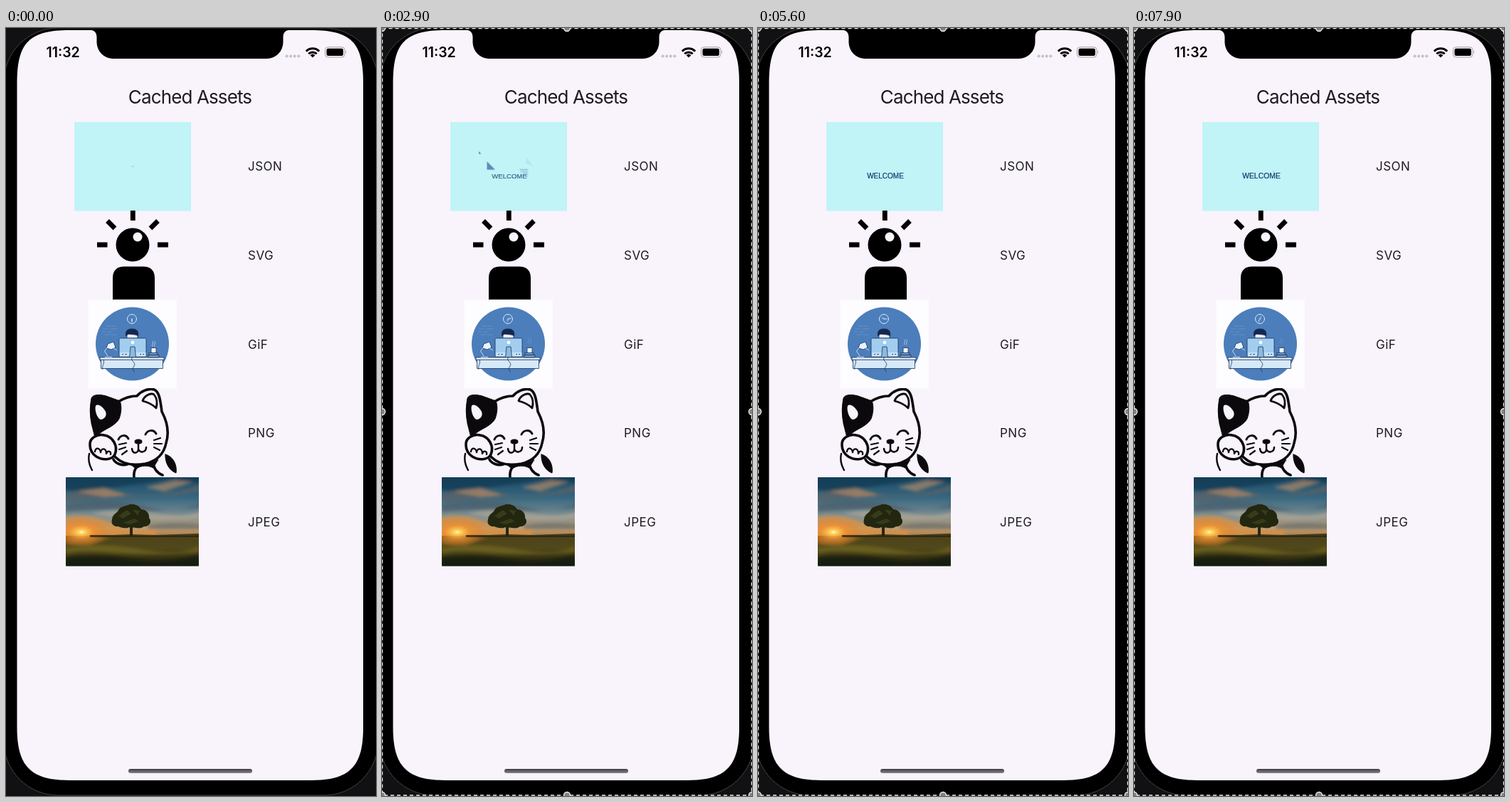
Recreate the animation shown at these times as an HTML page. Size 520 by 1077 pixels, loop 8 s.

```html
<!DOCTYPE html>
<html lang="en">
<head>
<meta charset="utf-8">
<title>Cached Assets</title>
<style>
  html, body { margin: 0; width: 100%; height: 100%; overflow: hidden; background: #000; }
  svg { display: block; width: 100%; height: 100%; }
  text { font-family: Inter, Roboto, sans-serif; font-optical-sizing: none; fill: #1d1b20; }
  .labels text { font-size: 17px; letter-spacing: .5px; }
  .line { fill: none; stroke-linecap: round; stroke-linejoin: round; }

  .anim { animation: 8s linear infinite; }
  .select { animation-name: select; animation-timing-function: step-end; }
  .dot { animation-name: dot; }
  .burst { animation-name: burst; transform-origin: 178px 194px; }
  .wedge { animation-name: wedge; }
  .stripes { animation-name: stripes; }
  .drift { animation-name: drift; }
  .word { animation-name: word; transform-origin: 179px 207px; }
  .alarm { animation-name: alarm; animation-timing-function: step-end; }
  .calm { animation-name: calm; animation-timing-function: step-end; }
  .minute { animation-name: minute; transform-origin: 177px 408px; }
  .hour { animation-name: hour; transform-origin: 177px 408px; }
  .steam { animation: steam 1.6s linear infinite; }
  .shake { animation: shake .2s step-end infinite; transform-origin: 177px 408px; }

  @keyframes select { 0% { opacity: 0 } 23.75%, 100% { opacity: 1 } }
  @keyframes dot { 0%, 10% { opacity: 1 } 16%, 100% { opacity: 0 } }
  @keyframes burst {
    0%, 10% { transform: scale(.03); opacity: 0 }
    14% { transform: scale(.2); opacity: 1 }
    25% { transform: none; opacity: 1 }
    34%, 100% { transform: scale(1.4); opacity: 0 }
  }
  @keyframes wedge {
    0%, 13% { transform: translate(178px, 194px) scale(0); fill: #123b78 }
    25% { transform: translate(165px, 184px); fill: #123b78; opacity: 1 }
    46.25% { transform: translate(132px, 190px) scale(1.08); fill: #a5d0ef; opacity: 1 }
    53%, 100% { transform: translate(121px, 192px); fill: #a5d0ef; opacity: 0 }
  }
  @keyframes stripes {
    0%, 13% { transform: translate(178px, 194px) scale(0) }
    25% { transform: translate(179px, 191px); opacity: 1 }
    46.25% { transform: translate(206px, 204px) scale(.95); opacity: .85 }
    53%, 100% { transform: translate(215px, 208px); opacity: 0 }
  }
  @keyframes drift {
    0%, 26% { opacity: 0; transform: translate(0, 5px) }
    34% { opacity: 1 }
    46.25% { opacity: 1; transform: none }
    53%, 100% { opacity: 0; transform: translate(0, -3px) }
  }
  @keyframes word {
    0%, 30% { opacity: 0; transform: scale(.8) }
    38% { opacity: 1; transform: none }
    91% { opacity: 1; transform: none }
    98.75%, 100% { opacity: 1; transform: scale(1.04) }
  }
  @keyframes alarm { 0% { opacity: 0 } 18.75% { opacity: 1 } 32.5%, 100% { opacity: 0 } }
  @keyframes calm { 0% { opacity: 1 } 18.75% { opacity: 0 } 32.5%, 100% { opacity: 1 } }
  @keyframes minute {
    0% { transform: rotate(180deg) }
    46.25% { transform: rotate(510deg) }
    57%, 89% { transform: rotate(810deg) }
    98.75%, 100% { transform: rotate(930deg) }
  }
  @keyframes hour {
    0% { transform: rotate(180deg) }
    46.25% { transform: rotate(200deg) }
    57%, 89% { transform: rotate(305deg) }
    98.75%, 100% { transform: rotate(385deg) }
  }
  @keyframes steam {
    0% { transform: none; opacity: 1 }
    50% { opacity: .9 }
    85%, 100% { transform: translateY(-4px); opacity: .2 }
  }
  @keyframes shake { 0% { transform: rotate(-6deg) } 50% { transform: rotate(6deg) } }
</style>
</head>
<body>
<svg viewBox="0 0 520 1077" preserveAspectRatio="none">
  <defs>
    <linearGradient id="home" x2="0" y2="1">
      <stop stop-color="#3d3b3f"/><stop offset="1" stop-color="#89858b"/>
    </linearGradient>
    <linearGradient id="sky" x2="0" y2="1">
      <stop stop-color="#1c4a66"/><stop offset=".35" stop-color="#386880"/>
      <stop offset=".65" stop-color="#7d8d92"/><stop offset=".88" stop-color="#bf9a6c"/><stop offset="1" stop-color="#a87a46"/>
    </linearGradient>
    <linearGradient id="field" x2="0" y2="1">
      <stop stop-color="#4f421b"/><stop offset=".4" stop-color="#50481a"/><stop offset="1" stop-color="#1c1d0c"/>
    </linearGradient>
    <radialGradient id="sun">
      <stop stop-color="#fffad0"/><stop offset=".12" stop-color="#ffd35c"/>
      <stop offset=".45" stop-color="#f3912e" stop-opacity=".75"/><stop offset="1" stop-color="#e07a2a" stop-opacity="0"/>
    </radialGradient>
    <filter id="soft" x="-30%" y="-50%" width="160%" height="200%"><feGaussianBlur stdDeviation="2"/></filter>
    <filter id="leafy"><feGaussianBlur stdDeviation=".7"/></filter>
    <clipPath id="photo"><rect x="84" y="630" width="187" height="124.5"/></clipPath>
    <clipPath id="catBox"><rect x="115" y="505" width="125" height="125"/></clipPath>
  </defs>

  <!-- phone -->
  <rect width="520" height="1077" fill="#111113"/>
  <rect x="-3" y="0" width="526" height="1076" rx="76" stroke="#434345"/>
  <path fill="#f9f3fc" d="M15.500 77C15.500 20 33 3 90 3H428C485 3 502 20 502 77V981C502 1036 483 1055 428 1055H90C35 1055 15.500 1036 15.500 981Z"/>
  <path d="M116 2C124 3 127.500 6 127.500 13V20A23 23 0 0 0 150.500 43H366.500A23 23 0 0 0 389.500 20V13C389.500 6 393 3 401 2Z"/>
  <rect x="172" y="1039" width="174" height="6" rx="3" fill="url(#home)"/>

  <!-- status bar -->
  <text x="56.500" y="41" font-size="19.500" font-weight="600" style="fill:#000">11:32</text>
  <path class="line" stroke="#c3bec6" stroke-width="4" stroke-dasharray="0 5.6" d="M394.5 39.5H413"/>
  <path fill="none" stroke="#000" stroke-width="3" d="M421.800 32.600A13 13 0 0 1 440.200 32.600M425.300 36.300A8 8 0 0 1 436.700 36.300"/>
  <path d="M427.600 38.200A5 5 0 0 1 434.400 38.200L431 41.400Z"/>
  <rect x="448.500" y="26.800" width="27.500" height="14.200" rx="4" fill="none" stroke="#a19da4"/>
  <rect x="450.500" y="28.800" width="23.500" height="10.200" rx="2.500"/>
  <path fill="#a19da4" d="M477.300 31.500Q479.400 33.700 477.300 36Z"/>

  <text x="258.500" y="106" font-size="26" letter-spacing="-.88" text-anchor="middle">Cached Assets</text>
  <g class="labels">
    <text x="340" y="200.300">JSON</text>
    <text x="340" y="325">SVG</text>
    <text x="340" y="449.500">GiF</text>
    <text x="340" y="574">PNG</text>
    <text x="340" y="698.700">JPEG</text>
  </g>

  <!-- welcome card -->
  <rect x="96" y="132" width="164" height="124.500" fill="#c0f4f6"/>
  <circle class="anim dot" cx="178" cy="194" r=".8" fill="#6fa9b8"/>
  <g class="anim burst" stroke="#5f93b0" stroke-width=".8" fill="none">
    <path d="M134.500 162.500V167M150.500 162V174M163.500 162V174M195.500 200V212M167.500 220V232M189.500 219V230M146.500 228V234M143.500 216V218M201 201V203"/>
    <path stroke="#8fbfd2" d="M120 188.500H132M178 185.500H191"/>
  </g>
  <path class="anim wedge" d="M0 0V11H11Z"/>
  <path class="anim stripes" fill="none" stroke="#6f9fd0" stroke-width=".9" d="M0 .5H12M2 3H12M4.500 5.500H12M7 8H12M9.500 10.500H12"/>
  <g class="anim drift">
    <path fill="#5f88ad" d="M136 170.500V174H139.500Z"/>
    <path fill="#b6e6f3" d="M203 179L213 192L202 187Z"/>
  </g>
  <g class="anim word">
    <text x="179" y="211" text-anchor="middle" stroke="#12356b" stroke-width=".2" style="font:10px 'Liberation Sans',Arial,sans-serif;fill:#12356b">WELCOME</text>
    <path stroke="#8dbccb" stroke-width=".6" d="M195.500 200V206"/>
  </g>

  <!-- idea icon -->
  <path d="M150 380.700V351Q150 334.500 166.500 334.500H192.500Q209 334.500 209 351V380.700Z"/>
  <circle cx="178" cy="304" r="23.500"/>
  <circle cx="185" cy="293" r="6.500" fill="#f9f3fc"/>
  <path stroke="#000" stroke-width="6.800" d="M178.300 256V270M128 304H142.500M213 304H228M142.500 270.500L153 281M213.500 270.500L203 281"/>

  <!-- desk scene -->
  <rect x="115.500" y="381" width="124.500" height="124.500" fill="#fdfcff"/>
  <circle cx="177.500" cy="443" r="51.500" fill="#4b7eba"/>
  <path class="line" stroke="#729dcd" stroke-width=".7" d="M141 418H147M149 418H153M137 422H143M146 422H156M136 426H140M143 426H149M139 430H146M148 430H155"/>
  <g class="anim calm line" stroke="#dcecfa">
    <circle cx="177" cy="408" r="6.500"/>
    <path class="anim minute" d="M177 408V403.800"/>
    <path class="anim hour" d="M177 408V405"/>
  </g>
  <g class="anim alarm">
    <g class="shake line" stroke="#d9793f">
      <circle cx="177" cy="408" r="6.800" stroke-width="1.300"/>
      <ellipse cx="177" cy="408" rx="3.800" ry="4.800"/>
      <path d="M177 405.500V410.500M168.500 405.500V410.500M185.500 405.500V410.500"/>
    </g>
  </g>
  <g stroke="#19325f" stroke-width=".8" stroke-linejoin="round">
    <path fill="#e8eef5" d="M170 429H185V435H170Z"/>
    <path fill="#17264b" d="M168.500 432C167 424 172 421.500 178 422C184 422 187 426 185.500 432C183 429 174 430 172 429Z"/>
    <rect x="159" y="435" width="38" height="26" rx="1.500" fill="#a3cdef"/>
    <path fill="#c4e1f6" d="M160 455H196.500V460.500H160Z" stroke="none"/>
    <path fill="#8dbae0" d="M175 447H181L182.500 462H173.500Z"/>
    <path fill="none" d="M163 457.500H165M167 457.500H170M188 457.500H190M192 457.500H194"/>
    <path fill="#d5e9f8" d="M133.500 465H220.500V477.500H133.500Z"/>
    <path fill="#f4faff" d="M132 462H222V465.200H132Z"/>
    <path fill="#6f9ac6" d="M200 458.500H215V462H200ZM201 455.500H213V458.500H201Z"/>
    <path fill="#edf5fc" d="M204 448.500H211V455.500H204ZM211 450Q214 451 211 453.500"/>
    <path fill="#eaf4fc" d="M143 443L151 440L154 448L148 451L141 449Z"/>
    <path fill="none" stroke="#e2eef8" d="M143 447L138.500 453L143 460M139 461.500H149M151 449L156 452"/>
    <path fill="none" d="M178 461C173 467 184 469 180 474C177 478 178 480 181 482M137 465C139 471 134 474 136 479"/>
  </g>
  <circle cx="178" cy="441" r="2.300" fill="#fff"/>
  <path class="steam line" stroke="#d3e5f5" stroke-width=".8" d="M206 446.500C204 444 208 442 206 439.500M209 446.500C207 444 211 442 209 439.500"/>

  <!-- waving cat -->
  <g clip-path="url(#catBox)" class="line" stroke="#0b090c" stroke-width="3.600">
    <path d="M117 597C115 606 117 613 121 620" stroke-width="2.400"/>
    <path fill="#f9f3fc" d="M121 521C122 515 130 515 139 517L158 524C166 519 175 516 184 516C190 509 200 505 208 507C216 510 217 524 219 538C226 551 230 566 225 582C222 597 212 607 196 611C180 614 164 612 154 602L127 572C120 556 118 538 121 521Z"/>
    <path fill="#0b090c" stroke-width="1" d="M120 521C121 514 130 514 140 516L160 523C163 530 162 540 159 548C154 557 143 561 135 566C131 569 128 572 125 574C120 556 118 537 120 521Z"/>
    <path fill="#f9f3fc" stroke="none" d="M126 530C129 526 136 531 140 538C142 543 139 548 134 549C129 550 124 536 126 530Z"/>
    <path stroke-width="2.800" d="M192 523C194 516 203 511 208 514C212 519 213 526 211 533C206 528 200 525 192 523Z"/>
    <path d="M158 577C161 570 169 570 172 576M196 570C199 563 208 563 211 569" stroke-width="3"/>
    <path d="M186 583V589M177 590C178 598 186 597 186 590C188 597 197 595 197 588" stroke-width="2.500"/>
    <ellipse cx="186" cy="580" rx="4.500" ry="2.500" fill="#0b090c" stroke-width="2"/>
    <path stroke-width="2.200" d="M159 584L169 582M159 591L168 588M163 598L170 593M208 578L217 575M208 583L219 583M208 588L216 592"/>
    <path fill="#f9f3fc" d="M118 585C117 575 128 569 138 571C150 573 158 586 153 598C148 607 135 606 127 601C121 597 118 591 118 585Z"/>
    <path stroke-width="2.300" d="M125 594C126 587 132 589 133 595C134 588 141 589 141 597C143 591 148 594 147 598"/>
    <path d="M151 605C154 611 163 614 170 612M187 613C181 617 179 622 180 630M207 609C207 617 212 624 220 627"/>
    <path fill="#0b090c" stroke-width="1" d="M174 611C185 615 202 612 214 605L207 617C200 613 190 613 183 618Z"/>
    <path fill="#0b090c" stroke-width="1" d="M224 598C234 600 241 612 239 624C230 621 223 610 224 598Z"/>
  </g>

  <!-- sunset photo -->
  <g clip-path="url(#photo)">
    <rect x="84" y="630" width="187" height="83" fill="url(#sky)"/>
    <g filter="url(#soft)">
      <path fill="#153a52" d="M80 626H275V637L220 634L160 643L112 650L80 648Z" opacity=".75"/>
      <path fill="#5d6266" d="M84 654Q125 640 166 652T275 640V649Q230 658 185 658T84 664Z" opacity=".8"/>
      <path fill="#b58a66" d="M100 650L138 645L170 655L140 658ZM196 644L238 634L262 637L222 650Z" opacity=".65"/>
      <path fill="#4b5d69" d="M84 668Q140 656 192 670T275 664V672Q220 679 180 676T84 678Z" opacity=".7"/>
      <path fill="#b6aa96" d="M120 681Q160 672 205 680T275 678V688Q220 692 170 689Z" opacity=".65"/>
      <path fill="#dd9342" d="M80 686Q116 678 145 694T210 703V713H80Z" opacity=".7"/>
      <path fill="#59666c" d="M200 697Q235 691 275 696V703H200Z" opacity=".6"/>
    </g>
    <rect x="84" y="712" width="187" height="43" fill="url(#field)"/>
    <g filter="url(#soft)">
      <path fill="#93651f" d="M84 714H150L118 725H84Z" opacity=".7"/>
      <path fill="#756a21" d="M84 729Q135 721 190 731T271 727V735Q200 741 150 736T84 738Z" opacity=".7"/>
      <path fill="#16190b" d="M84 743Q135 736 180 745T271 738V760H84Z" opacity=".75"/>
    </g>
    <ellipse cx="106" cy="707" rx="40" ry="21" fill="url(#sun)"/>
    <g fill="#23270f" filter="url(#leafy)">
      <path d="M149 690C149 683 154 681 157 678C160 670 168 671 174 668C181 667 187 670 190 675C198 675 202 682 201 687C206 693 201 699 194 699C188 704 180 699 178 701L178 712H174L174 700C167 703 161 700 158 699C151 700 147 694 149 690Z"/>
      <path fill="#42451f" d="M158 684L170 676L176 681L164 688ZM178 675L188 677L185 684ZM165 694L180 688L187 692L174 696Z" opacity=".7"/>
    </g>
    <path fill="#25260f" d="M118 711H151L175 710L210 711L271 709V714H118Z" opacity=".8"/>
  </g>

  <!-- recording selection -->
  <g class="anim select">
    <rect x=".5" y=".5" width="519" height="1076" fill="none" stroke="#161616" stroke-width="2"/>
    <rect x=".5" y=".5" width="519" height="1075.500" fill="none" stroke="#e4e4e4" stroke-width="1.300" stroke-dasharray="5 4"/>
    <g fill="#858585" stroke="#f2f2f2" stroke-width="1.300">
      <circle r="4.500"/><circle cx="260" r="4.500"/><circle cx="520" r="4.500"/>
      <circle cy="538" r="4.500"/><circle cx="520" cy="538" r="4.500"/>
      <circle cy="1076" r="4.500"/><circle cx="260" cy="1076" r="4.500"/><circle cx="520" cy="1076" r="4.500"/>
    </g>
  </g>
</svg>
</body>
</html>
```
